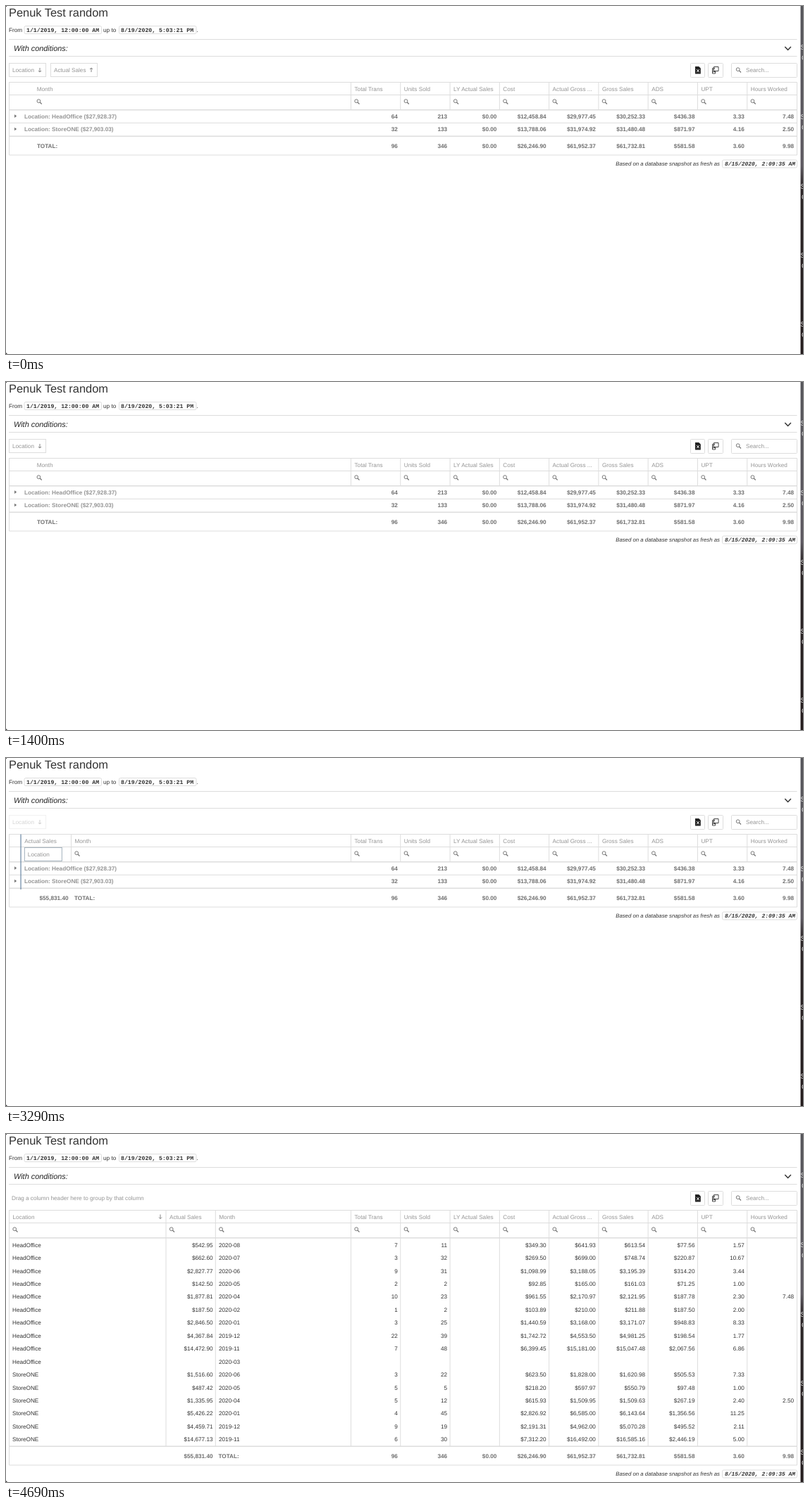
These frames come from a looping animation (1131 by 495 pixels, 4970 ms). An HTML page:

```html
<!DOCTYPE html>
<html lang="en">
<head>
<meta charset="utf-8">
<title>Sales grid: ungrouping columns</title>
<style>
  html, body { margin: 0; width: 100%; height: 100%; overflow: hidden; background: #fff; }
  svg { display: block; width: 1131px; height: 495px; }
  text { font: 8.2px "Liberation Sans", Arial, sans-serif; fill: #959595; text-rendering: geometricPrecision; white-space: pre; }
  .title { font-size: 16.4px; fill: #333; }
  .cond { font-size: 10.9px; font-style: italic; fill: #222; }
  .dark, .cell { fill: #333; }
  .sum { font-weight: bold; fill: #707070; }
  .group { font-weight: bold; }
  .note { font-size: 7.8px; font-style: italic; fill: #333; }
  .mono { font: bold 8.2px "Liberation Mono", "Courier New", monospace; fill: #333; }
  .slant { font-size: 7.95px; font-style: italic; }
  .desk { fill: #ddd; font-size: 10px; }
  .line { fill: none; stroke: #ddd; }
  .icon { fill: none; stroke: #777; }
  .ink { fill: none; stroke: #333; }
  .ghost rect { fill: #fff; stroke: #a3b1bc; }
</style>
</head>
<body>
<svg id="stage" viewBox="0 0 1131 495"></svg>
<script>
const LOOP = 4970, STEP = 70;
const LEFT = 4, RIGHT = 1122.5, FIRST = 489.5, COL = 70.28, ROW = 18.45, GROWTH = 259;
const HEADS = ['Total Trans', 'Units Sold', 'LY Actual Sales', 'Cost', 'Actual Gross ...',
  'Gross Sales', 'ADS', 'UPT', 'Hours Worked'];
const GROUPS = `
Location: HeadOffice ($27,928.37)|64 213 $0.00 $12,458.84 $29,977.45 $30,252.33 $436.38 3.33 7.48
Location: StoreONE ($27,903.03)|32 133 $0.00 $13,788.06 $31,974.92 $31,480.48 $871.97 4.16 2.50`;
const TOTALS = '96 346 $0.00 $26,246.90 $61,952.37 $61,732.81 $581.58 3.60 9.98';
// location, sales, month, then the nine value columns; "-" is an empty cell
const CELLS = `
HeadOffice $542.95 2020-08 7 11 - $349.30 $641.93 $613.54 $77.56 1.57
HeadOffice $662.60 2020-07 3 32 - $269.50 $699.00 $748.74 $220.87 10.67
HeadOffice $2,827.77 2020-06 9 31 - $1,098.99 $3,188.05 $3,195.39 $314.20 3.44
HeadOffice $142.50 2020-05 2 2 - $92.85 $165.00 $161.03 $71.25 1.00
HeadOffice $1,877.81 2020-04 10 23 - $961.55 $2,170.97 $2,121.95 $187.78 2.30 7.48
HeadOffice $187.50 2020-02 1 2 - $103.89 $210.00 $211.88 $187.50 2.00
HeadOffice $2,846.50 2020-01 3 25 - $1,440.59 $3,168.00 $3,171.07 $948.83 8.33
HeadOffice $4,367.84 2019-12 22 39 - $1,742.72 $4,553.50 $4,981.25 $198.54 1.77
HeadOffice $14,472.90 2019-11 7 48 - $6,399.45 $15,181.00 $15,047.48 $2,067.56 6.86
HeadOffice - 2020-03
StoreONE $1,516.60 2020-06 3 22 - $623.50 $1,828.00 $1,620.98 $505.53 7.33
StoreONE $487.42 2020-05 5 5 - $218.20 $597.97 $550.79 $97.48 1.00
StoreONE $1,335.95 2020-04 5 12 - $615.93 $1,509.95 $1,509.63 $267.19 2.40 2.50
StoreONE $5,426.22 2020-01 4 45 - $2,826.92 $6,585.00 $6,143.64 $1,356.56 11.25
StoreONE $4,459.71 2019-12 9 19 - $2,191.31 $4,962.00 $5,070.28 $495.52 2.11
StoreONE $14,677.13 2019-11 6 30 - $7,312.20 $16,492.00 $16,585.16 $2,446.19 5.00`;

const lines = s => s.trim().split('\n');
const colX = i => FIRST + i * COL;
const text = (x, y, s, cls = '', anchor = 'start') =>
  `<text x="${x}" y="${y}" class="${cls}" text-anchor="${anchor}">${s}</text>`;
const path = (d, cls = 'line', extra = '') => `<path d="${d}" class="${cls}" ${extra}/>`;
const box = (x, y, w, h, r = 0) => `<rect x="${x}" y="${y}" width="${w}" height="${h}" rx="${r}" class="line"/>`;
const group = (id, body, cls = '') => `<g id="${id}" class="${cls}">${body}</g>`;
const lens = (x, y) => `<circle cx="${x - .8}" cy="${y - .8}" r="2.4" class="icon"/>`
  + path(`M${x + 1} ${y + 1}l2.5 2.5`, 'icon', 'stroke-width="1.3"');
const arrow = (x, y, dir) => path(`M${x} ${y + 3}v-6m-2 ${dir > 0 ? 4 : 2}l2 ${2 * dir}l2 ${-2 * dir}`, 'icon', 'stroke-width=".9"');
const numbers = (list, y, cls) => list.map((s, i) =>
  s === '-' ? '' : text(colX(i + 1) - 4, y, s, cls, 'end')).join('');
const column = (x, name) => text(x + 5, 120.5, name) + lens(x + 8.5, 136);
const chip = (id, x, w, name, dir) =>
  group(id, box(x + .5, 81.5, w - 1, 19) + text(x + 5, 94, name) + arrow(x + w - 9, 91, dir));
const ghost = (id, w, name) =>
  group(id, `<rect x=".5" y=".5" width="${w}" height="19"/>` + text(5, 12.7, name), 'ghost');
const rule = (id, x) =>
  `<rect id="${id}" x="${x}" y="108.5" width="1.7" height="78.5" fill="#5d7f9c" opacity=".65"/>`;

const backdrop = `
  <linearGradient id="desk" x2="0" y2="1">
    <stop stop-color="#55555a"/><stop offset=".46" stop-color="#5c5860"/>
    <stop offset=".52" stop-color="#2b2527"/><stop offset="1" stop-color="#241c1d"/>
  </linearGradient>
  <rect x="1127.5" width="4" height="495" fill="url(#desk)"/>`
  + [62, 161, 260, 358, 456].map(y => text(1127.5, y, 'S', 'desk') + text(1129, y + 15, 'C', 'desk')).join('')
  + path('M0 493v2h2z', '', 'fill="#333"') + path('M0 0h1.5l-1.5 1.5z', '', 'fill="#333"');

const header = text(4, 15, 'Penuk Test random', 'title')
  + text(4, 37, 'From', 'dark') + box(26, 28.5, 109.5, 11, 2) + text(29, 36.8, '1/1/2019, 12:00:00 AM', 'mono')
  + text(138, 37, 'up to', 'dark') + box(160.5, 28.5, 109.5, 11, 2) + text(163, 36.8, '8/19/2020, 5:03:21 PM', 'mono')
  + text(270.5, 37, '.', 'dark')
  + path(`M${LEFT} 47.5H${RIGHT}M${LEFT} 71.5H${RIGHT}`)
  + text(11, 64.3, 'With conditions:', 'cond')
  + path('M1105.3 58l4.3 4.4 4.3-4.4', 'ink', 'stroke-width="1.5"');

const toolbar = box(971.5, 81.5, 20, 20, 1) + box(996.5, 81.5, 21, 20, 1) + box(1029.5, 81.5, 93, 20, 1)
  + path('M978 86h5.2l2.6 2.6v7.9h-7.8z', '', 'fill="#222"')
  + path('M980.2 90.2l3.4 4m0-4l-3.4 4', '', 'stroke="#fff"')
  + path('M1004.5 86.5h6.5v6h-6.5zM1006 88.5h-3.5v7.5h4v-3.5M1002.5 91h2M1002.5 93.5h4', 'ink', 'stroke-width=".9"')
  + lens(1039.5, 91) + text(1050, 94, 'Search...');

const frame = path(`M${LEFT} 108.5H${RIGHT}M${LEFT} 126.5H${RIGHT}M${LEFT + .5} 108.5V186M${RIGHT} 108.5V186`)
  + path(`M${LEFT} 147.7H${RIGHT}`, 'line', 'stroke-width="1.6"')
  + HEADS.map((name, i) => path(`M${colX(i)} 108.5V148`) + column(colX(i), name)).join('');

const groupRows = lines(GROUPS).map((row, i) => {
  const [label, values] = row.split('|'), y = 160 + i * ROW;
  return path(`M12 ${y - 5.7}l3.2 2.3-3.2 2.3z`, '', 'fill="#777"') + text(26, y, label, 'group')
    + numbers(values.split(' '), y, 'sum');
}).join('') + path(`M${LEFT} 166.3H${RIGHT}`);

const dataRows = lines(CELLS).map((row, i) => {
  const [place, sales, month, ...values] = row.split(' '), y = 160.6 + i * ROW;
  return text(9, y, place, 'cell') + (sales === '-' ? '' : text(293.5, y, sales, 'cell', 'end'))
    + text(302, y, month, 'cell') + numbers(values, y, 'cell');
}).join('');

const sides = path(`M${LEFT + .5} 186V445M${RIGHT} 186V445`);
const rules = HEADS.map((_, i) => path(`M${colX(i)} 148V444.5`)).join('');
const total = (x, sales) => text(x, 202, 'TOTAL:', 'sum')
  + (sales ? text(sales, 202, '$55,831.40', 'sum', 'end') : '');

const footer = path(`M${LEFT} 185.3H${RIGHT}`, 'line', 'stroke-width="1.5"')
  + path(`M${LEFT + .5} 185V212H${RIGHT}V185`)
  + numbers(TOTALS.split(' '), 202, 'sum')
  + group('totalGrouped', total(44)) + group('totalMoved', total(97, 88.5)) + group('totalFlat', total(301.5, 293.5))
  + text(1013, 227.3, 'Based on a database snapshot as fresh as', 'note', 'end')
  + box(1016.5, 219, 106, 11, 2) + text(1020, 227.2, '8/15/2020, 2:09:35 AM', 'mono slant');

document.getElementById('stage').innerHTML = backdrop + header + toolbar
  + chip('placeChip', 4, 53, 'Location', 1) + chip('salesChip', 63, 67, 'Actual Sales', -1)
  + group('hint', text(8, 94, 'Drag a column header here to group by that column'))
  + frame + group('groups', groupRows)
  + group('grouped', column(38.7, 'Month'))
  + group('moved', column(21.3, 'Actual Sales') + path('M92.5 108.5V148') + column(92.5, 'Month'))
  + group('flat', column(LEFT + .5, 'Location') + arrow(219, 117.5, 1) + column(227, 'Actual Sales')
    + column(297.3, 'Month') + path('M227 108.5V444.5M297.3 108.5V444.5') + sides + rules + dataRows)
  + group('footer', footer)
  + rule('salesRule', 38) + rule('placeRule', 20.2)
  + ghost('salesGhost', 67, 'Actual Sales') + ghost('placeGhost', 53, 'Location');

const el = id => document.getElementById(id);
const show = (id, on) => el(id).style.display = on ? '' : 'none';

// The ghost eases from its chip to the drop point, then waits until the drop.
function drag(name, t, start, steps, drop, [x0, y0], [x1, y1]) {
  const active = t >= start && t < drop;
  const i = Math.max(0, Math.min(steps, Math.floor((t - start) / STEP)));
  const p = 1 - (1 - i / steps) ** 2.6;
  const y = y0 + (y1 - y0) * p;
  el(name + 'Ghost').setAttribute('transform', `translate(${x0 + (x1 - x0) * p} ${y})`);
  show(name + 'Ghost', active);
  show(name + 'Rule', active && y > 98);
  show(name + 'Chip', t < drop);
  el(name + 'Chip').setAttribute('opacity', active ? .4 : 1);
}

function draw() {
  const t = performance.now() % LOOP;
  const view = t < 1610 ? 'grouped' : t < 3990 ? 'moved' : 'flat';
  for (const name of ['grouped', 'moved', 'flat']) {
    show(name, name === view);
    show('total' + name[0].toUpperCase() + name.slice(1), name === view);
  }
  show('groups', view !== 'flat');
  show('hint', t >= 3710);
  el('footer').setAttribute('transform', `translate(0 ${view === 'flat' ? GROWTH : 0})`);
  drag('sales', t, 770, 5, 1400, [66, 84], [93.5, 113]);
  drag('place', t, 3010, 6, 3710, [7, 85], [27, 129.5]);
  requestAnimationFrame(draw);
}
draw();
</script>
</body>
</html>
```
